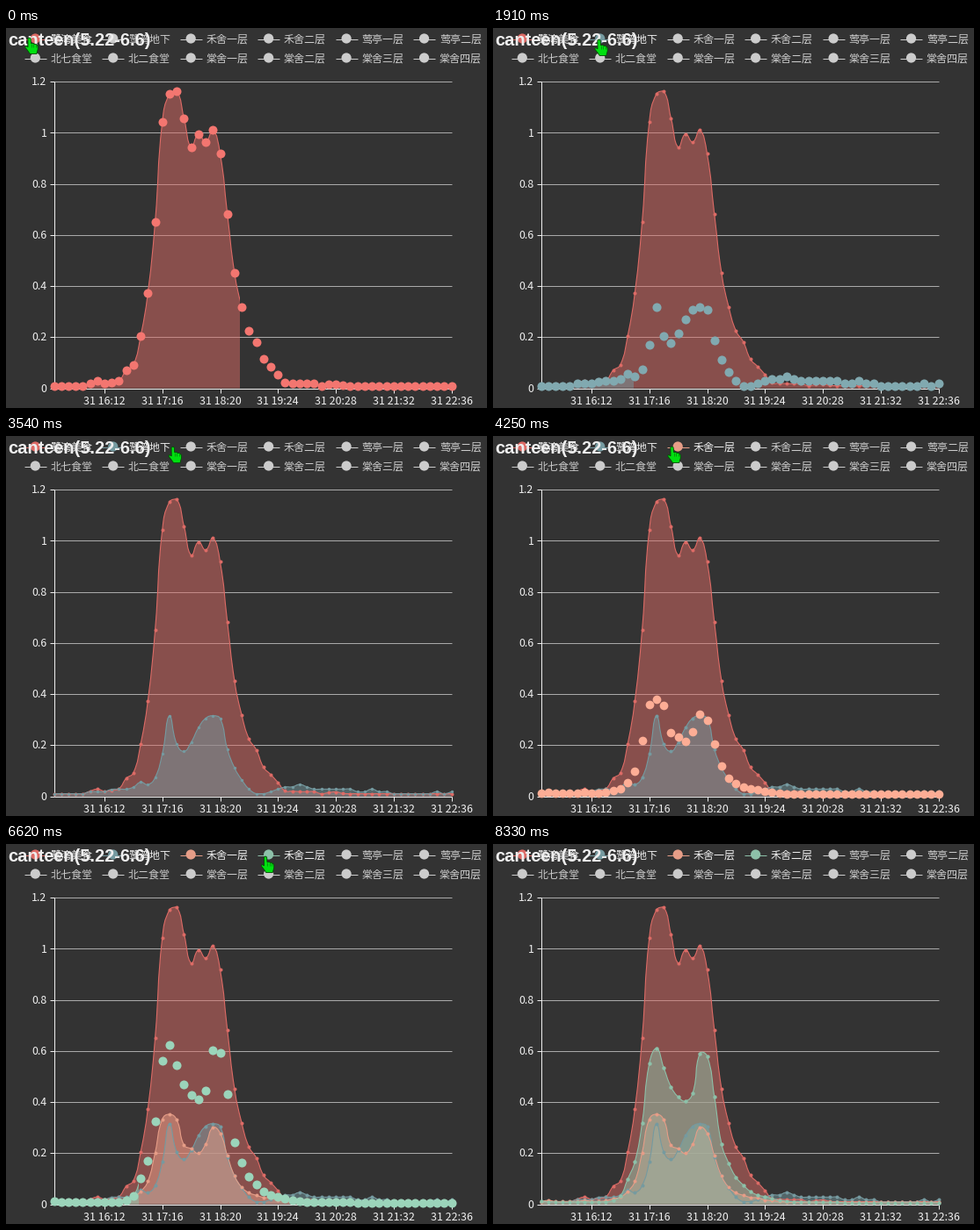
Animation of 547 by 433 pixels, one loop 9.91 s. Source, as a matplotlib script:

```python
import numpy as np
import matplotlib.pyplot as plt
from matplotlib.animation import FuncAnimation
from matplotlib.patches import Circle, PathPatch, Polygon
from matplotlib.path import Path
from matplotlib.transforms import Bbox, TransformedBbox

W, H, DPI = 547, 433, 100
LOOP, FRAMES = 9910, 198
PX = 72 / DPI
LEFT, RIGHT, BASE, UNIT = 54.5, 506.5, 410.5, 291.2
COUNT = 56
XS = np.linspace(LEFT, RIGHT, COUNT)
CJK = "Noto Sans CJK JP"
LIGHT, IDLE = "#eeeeee", "#cccccc"

fig = plt.figure(figsize=(W / DPI, H / DPI), dpi=DPI, facecolor="#333333")
ax = fig.add_axes([0, 0, 1, 1])
ax.set_xlim(0, W)
ax.set_ylim(H, 0)
ax.axis("off")


def segment(xs, ys, color, z=1, width=1):
    return ax.plot(xs, ys, color=color, lw=width * PX, zorder=z,
                   solid_capstyle="butt")[0]


def label(x, y, text, size=12, color=LIGHT, font=CJK, z=5, **kw):
    return ax.text(x, y, text, fontsize=size * PX, color=color, family=font,
                   va="baseline", zorder=z, **kw)


def elastic_out(k):
    if k <= 0 or k >= 1:
        return float(k >= 1)
    return 2 ** (-10 * k) * np.sin((k - 0.1) * 5 * np.pi) + 1


def smooth_path(ys, smooth=0.5):
    """Bezier curve whose handles follow the chord between neighbours."""
    pts = np.column_stack([XS, ys])
    low, high = pts.min(axis=0), pts.max(axis=0)
    before, after = pts.copy(), pts.copy()
    for i in range(1, COUNT - 1):
        chord = pts[i + 1] - pts[i - 1]
        d0 = np.hypot(*(pts[i] - pts[i - 1]))
        d1 = np.hypot(*(pts[i + 1] - pts[i]))
        ratio = d1 / (d0 + d1)
        before[i] = np.clip(pts[i] - chord * smooth * (1 - ratio), low, high)
        after[i] = np.clip(pts[i] + chord * smooth * ratio, low, high)
    verts, codes = [pts[0]], [Path.MOVETO]
    for i in range(1, COUNT):
        verts += [after[i - 1], before[i], pts[i]]
        codes += [Path.CURVE4] * 3
    return verts, codes


class Series:
    """A smoothed area line that is wiped in and highlighted while hovered."""

    def __init__(self, order, color, start, leave, lift, values):
        self.color, self.start, self.leave, self.lift = color, start, leave, lift
        rgb = [int(color[i:i + 2], 16) for i in (1, 3, 5)]
        self.bright = tuple(min(1, c * 1.1 / 255) for c in rgb)
        tail = [values[-1]] * (COUNT - len(values))
        self.values = np.array(values + tail) / 1000
        verts, codes = smooth_path(BASE - self.values * UNIT)
        closed = verts + [(RIGHT, BASE), (LEFT, BASE), verts[0]]
        ends = [Path.LINETO, Path.LINETO, Path.CLOSEPOLY]
        step = order * 0.01
        self.area = PathPatch(Path(closed, codes + ends), fc=color, ec="none",
                              lw=0, alpha=0.5, zorder=2 + step)
        self.line = PathPatch(Path(verts, codes), fc="none", ec=color,
                              lw=1.1 * PX, zorder=3 + step)
        ax.add_patch(self.area)
        ax.add_patch(self.line)
        self.dots, = ax.plot(XS, XS, "o", mew=0, zorder=4 + step)

    def update(self, t):
        shown = t >= self.start
        for part in (self.area, self.line, self.dots):
            part.set_visible(shown)
        if not shown:
            return
        age = t - self.start
        edge = LEFT + (RIGHT + 1 - LEFT) * min(1, age / 1000)
        box = TransformedBbox(Bbox.from_extents(LEFT - 1, 0, edge, H), ax.transData)
        self.area.set_clip_box(box)
        self.line.set_clip_box(box)

        rest = (1 - min(1, age / 300)) ** 3
        self.dots.set_ydata(BASE - self.values * UNIT * (1 + self.lift * rest))
        if t < self.leave:
            size = 4 + 6 * elastic_out(age / 400)
        else:
            size = 10 - 6 * elastic_out((t - self.leave) / 400)
        self.dots.set_markersize(size * PX)
        self.dots.set_markerfacecolor(self.bright if t < self.leave else self.color)


class LegendItem:
    def __init__(self, col, row, name, series=None):
        x, y = 33.3 + 88.45 * col, 12 + 22 * row
        self.series = series
        self.bar = segment([x - 12.5, x + 12.5], [y + 0.5] * 2, IDLE, 5)
        self.dot = ax.add_patch(Circle((x, y), 5.6, fc=IDLE, ec="none", zorder=5.1))
        self.text = label(x + 17.3, y + 4.6, name, color=IDLE)

    def update(self, t):
        on = self.series is not None and t >= self.series.start
        color = self.series.color if on else IDLE
        self.bar.set_color(color)
        self.dot.set_facecolor(color)
        self.text.set_color(LIGHT if on else IDLE)


class Cursor:
    OUTLINE = np.array([
        (-1.6, 1), (0, 0), (1.6, 1), (2, 6.5), (4.6, 6.4), (5.4, 7.3),
        (7.6, 7.4), (8.6, 8.6), (9.6, 9.2), (9.8, 13), (8.3, 18.5),
        (0.8, 18.5), (-2, 14.5), (-4.8, 11), (-4, 9.3), (-1.5, 10.8)])
    TIMES = [0, 1100, 1640, 3270, 3540, 3810, 5450, 5720, 6080, 7890, 7980]
    XPOS = [26.5, 26.5, 120.5, 120.5, 200.5, 203.5, 203.5, 269, 295, 295, 300]
    YPOS = [11, 11, 13, 13, 12, 12, 12, 13, 14, 14, 7]
    GONE = 8150

    def __init__(self):
        self.hand = ax.add_patch(Polygon(self.OUTLINE, fc="#00e010", ec="#064d08",
                                         lw=0.9 * PX, zorder=9))
        self.creases = [segment([0, 0], [0, 0], "#078a0c", 9.1, 0.8)
                        for _ in range(3)]

    def update(self, t):
        x = np.interp(t, self.TIMES, self.XPOS)
        y = np.interp(t, self.TIMES, self.YPOS)
        self.hand.set_xy(self.OUTLINE + (x, y))
        for i, crease in enumerate(self.creases):
            cx = x + 2.1 + 2.5 * i
            crease.set_data([cx, cx], [y + 7, y + 11])
        for part in [self.hand, *self.creases]:
            part.set_visible(t < self.GONE)


# Axes and grid
for n in range(7):
    y = BASE - n * 0.2 * UNIT
    if n:
        segment([LEFT, RIGHT], [y, y], "#aaaaaa")
    segment([LEFT - 5, LEFT], [y, y], LIGHT)
    label(46.5, y + 4.2, f"{n * 0.2:.1g}" if n < 6 else "1.2", 12.4, ha="right")
segment([LEFT, LEFT], [BASE, BASE - 1.2 * UNIT], LIGHT, 1.1)
segment([LEFT, RIGHT], [BASE, BASE], LIGHT, 1.1)
for n in range(7):
    x = XS[7 + 8 * n]
    minutes = 16 * 60 + 12 + 64 * n
    segment([x, x], [BASE, BASE + 5], LIGHT)
    label(x, 429.3, f"31 {minutes // 60}:{minutes % 60:02d}", 12.4, ha="center")
label(2.5, 20.5, "canteen(5.22-6.6)", 20, font="Liberation Sans", z=6, weight="bold")

# Values in thousandths; the last one fills the rest of the row
series = [
    Series(0, "#dd6b66", -466, 1400, 0, [
        10, 10, 10, 10, 10, 20, 28, 20, 24, 30, 70, 92, 204, 374, 650, 1043,
        1153, 1163, 1057, 943, 995, 964, 1010, 917, 682, 450, 317, 224, 182,
        114, 85, 54, 21, 20, 18, 18, 18, 10, 14, 17, 11, 10]),
    Series(1, "#759aa0", 1670, 3400, 0.8, [
        10, 10, 10, 10, 10, 18, 18, 19, 27, 28, 28, 36, 55, 46, 73, 167, 315,
        204, 176, 212, 268, 305, 315, 305, 185, 111, 64, 28, 10, 10, 18, 28,
        36, 37, 46, 37] + [28] * 6 + [18, 18, 28, 18, 18] + [10] * 6
        + [18, 10, 18]),
    Series(2, "#e69d87", 4035, 5780, 0.9, [
        10, 15, 11, 11, 11, 11, 14, 12, 11, 14, 22, 28, 50, 90, 202, 333, 352,
        330, 232, 217, 200, 236, 300, 278, 190, 110, 66, 45, 35, 27, 25, 17,
        14, 11, 9, 8]),
    Series(3, "#8dc1a9", 6393, 8150, 0.8, [
        12, 10, 9, 8, 8, 10, 10, 9, 10, 10, 15, 33, 98, 167, 318, 552, 610,
        534, 460, 420, 404, 435, 590, 580, 422, 236, 160, 106, 75, 50, 36, 30,
        22, 16, 12, 10, 10, 9, 9, 8, 8, 7, 6, 5]),
]

names = [
    ["鹭湾美食", "鹭湾地下", "禾舍一层", "禾舍二层", "莺亭一层", "莺亭二层"],
    ["北七食堂", "北二食堂", "棠舍一层", "棠舍二层", "棠舍三层", "棠舍四层"],
]
legend = [LegendItem(col, row, name, series[col] if row == 0 and col < 4 else None)
          for row, line in enumerate(names) for col, name in enumerate(line)]
parts = [*series, *legend, Cursor()]


def draw(frame):
    t = frame * LOOP / FRAMES
    for part in parts:
        part.update(t)
    return []


anim = FuncAnimation(fig, draw, frames=FRAMES, interval=LOOP / FRAMES,
                     init_func=lambda: draw(0), repeat=True, repeat_delay=0,
                     blit=False)
plt.show()
```
